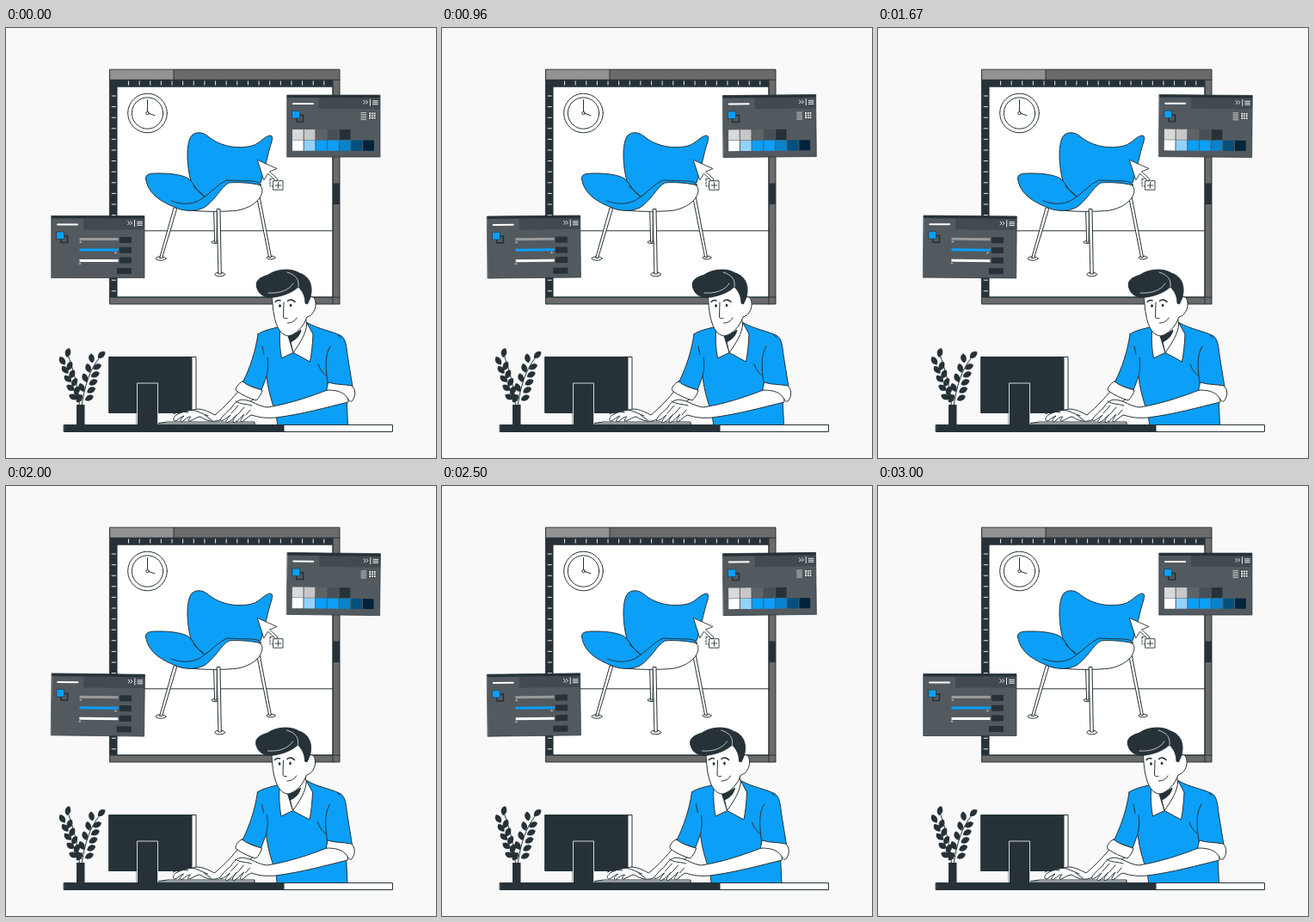
An HTML page that plays this animation: 500 px wide and 500 px high, repeating every 3040 ms.

```html
<!DOCTYPE html>
<html>
<head>
<meta charset="utf-8">
<style>
html, body { margin: 0; width: 100%; height: 100%; overflow: hidden; background: #f9f9f9; }
svg { display: block; width: 100%; height: 100%; }
.k { fill: #263238; }
.w { fill: #fff; }
.b { fill: #0b9ff8; }
.n { fill: none; }
.l { stroke: #263238; stroke-linecap: round; stroke-linejoin: round; }
</style>
</head>
<body>
<svg viewBox="0 0 500 500">
  <defs>
    <g id="panel">
      <path class="l" fill="#535a5f" stroke-width=".7" d="M0 0h108v72H0z"/>
      <path fill="#414a50" d="M37 3h71v13H37z"/>
      <path class="k" d="M0 0h108v3H0z"/>
      <path class="n" stroke="#fff" stroke-width="2" stroke-linecap="round" d="M7 10h23"/>
      <path class="n" stroke="#fff" stroke-width=".9" d="M88.500 6l2.200 2.200-2.200 2.200M91.500 6l2.200 2.200-2.200 2.200M96.500 4.500v8M99.200 6.800h6.500M99.200 8.800h6.500M99.200 10.800h6.500"/>
      <path class="n" stroke="#263238" stroke-width="1.700" d="M10.800 23.300h7.700v7.700h-7.700z"/>
      <path class="b l" stroke-width=".6" d="M6 18.500h8.500v8.500H6z"/>
    </g>
  </defs>

  <!-- drawing window -->
  <path class="l" fill="#6b6b6b" d="M120.800 48.200h267.200v272.800H120.800z"/>
  <path fill="#929292" d="M121.300 48.700h73.700v11.300h-73.700z"/>
  <path class="w l" d="M129 68h251v245H129z"/>
  <path class="k" d="M121 60h259v8.500H129.500v244.500H121zM380 180.500h8v24.500h-8z"/>
  <path class="n l" d="M121 60.300h267M380 60v261M121 313h267M195 48.500v11.500"/>
  <path id="ticks" class="n" stroke="#fff" stroke-width=".9"/>
  <path class="n l" d="M129 235.800h251"/>

  <!-- clock -->
  <g class="w l">
    <circle cx="164.500" cy="99" r="22.800"/>
    <circle cx="164.500" cy="99" r="18.200"/>
    <path d="M164.500 99V83.500M164.500 99l8.500 2.700"/>
    <circle cx="164.500" cy="99" r="1.700"/>
  </g>

  <!-- chair -->
  <g class="w l">
    <ellipse cx="244" cy="249" rx="5" ry="1.500"/>
    <path d="M242 211h3.500l-.5 38h-2z"/>
    <ellipse cx="180" cy="268" rx="6" ry="2.200"/>
    <path d="M195.500 209h3.500l-17.500 58.500h-2.500z"/>
    <ellipse cx="308" cy="267" rx="5" ry="1.900"/>
    <path d="M291.500 194l3-1 14 73.500h-2.500z"/>
    <path class="b" d="M215 178C210 160 209 133 216 125C221 120 229 121 235 126C249 138 270 141 286 137C296 134 300 126 307 125C310 125 310 128 309 132C304 147 302 162 296 180L255 190L231 200Z"/>
    <path d="M205 211C225 214 254 214 270 212C288 208 298 198 298 188C297 181 290 180 282 179L256 178L228 200Z"/>
    <path class="b" d="M162.500 175C162 169 169 169 180 169C192 169 206 171 212 175C219 181 222 191 231 196C239 191 246 182 257 177L284 178C292 178 295 180 297 183C286 180 270 179 259 180C250 185 242 202 230 209C221 213 212 213 203 211C184 204 165 195 162.500 175Z"/>
    <path class="n" d="M192 201C205 206 220 206 231 196M231 196C228 192 222 189 218 184"/>
    <ellipse cx="248.700" cy="286.500" rx="6" ry="2.300"/>
    <path d="M245.500 210.500h3.500l1.300 75.500h-3z"/>
  </g>

  <!-- cursor -->
  <g class="w l" stroke-width=".9">
    <path class="n" stroke-dasharray="2 1.500" d="M307 175.500h8.500v8.500H307z"/>
    <path d="M292.500 153.500L315 163.500L306.500 167L316 175.800L314 178L304.500 169.200L300 176.500Z"/>
    <path d="M311 177.700h11v10.500h-11zM316.500 179.700v6.500M313.200 183h6.600"/>
  </g>

  <!-- floating panels -->
  <g id="right">
    <use href="#panel" x="327" y="78"/>
    <path class="n" stroke="#ddd" stroke-width=".8" d="M412.500 98.500h6.500m-6.500 2h6.500m-6.500 2h6.500m-6.500 2h6.500m-6.500 2h6.500"/>
    <path class="w l" stroke-width=".7" d="M422 98h8v8h-8z"/>
    <path class="n l" stroke-width=".8" d="M424.700 98v8M427.300 98v8M422 100.700h8M422 103.300h8"/>
  </g>
  <g id="left">
    <use href="#panel" x="53" y="218.500"/>
    <g class="n" stroke-width="3">
      <path stroke="#9b9b9b" d="M85.500 245.500H130.500"/>
      <path stroke="#0b9ff8" d="M85.500 258H130.500"/>
      <path stroke="#fff" d="M85.500 270.500H130.500"/>
    </g>
    <path fill="#aaa" stroke="#555" stroke-width=".4" d="M86.700 246.500l2 3.500h-4zM127.500 259l2 3.500h-4zM86 271.500l2 3.500h-4z"/>
    <path class="k" d="M132 243h14v7h-14zM132 254.800h14v7h-14zM132 266.500h14v7h-14zM129 279h17v7h-17z"/>
  </g>

  <!-- plant, computer, desk -->
  <g id="plant" class="k">
    <path d="M82 438h9.500v24H82z"/>
    <path class="n l" d="M85.500 440C84 415 77 394 72 380M88 440C91 418 97 397 109 383"/>
  </g>
  <path class="w l" d="M215 382.500h6v65h-6z"/>
  <path class="k l" d="M120 382.500h96v65h-96z"/>
  <path class="w l" d="M177.500 459.500L188 458H289V461.500H177.500Z"/>
  <path class="n l" d="M178 460h111"/>

  <g id="person" class="l">
    <!-- far arm and hand -->
    <path class="w" d="M272 420C264 430 255 440 243 450C235 446 226 441 218 444C210 445 203 447 198 450C194 453 194 457 197 457C200 456 203 452 207 451C204 454 201 457 204 458C208 456 211 452 215 452C212 455 211 458 214 457C219 455 222 452 226 452C232 456 240 459 248 456C265 446 281 437 293 428Z"/>
    <path class="n" d="M216 444C223 445 229 449 235 451M195 449C200 446 206 446 212 447M231 450l8 6"/>
    <!-- torso -->
    <path class="b" d="M293 356C300 351 309 350 319 347L351 343C363 350 378 352 390 358C395 362 396 370 397 380L403 417L396 430L397.500 461.500H315.500C315 446 306 432 303 405L297 421L275 413C284 394 290 377 293 356Z"/>
    <path class="n" d="M303 405C305 397 305 390 304 383M298 370L300 380M374 413C372 396 370 382 377 370M363 391C365 397 368 401 372 404M386 357L389 360"/>
    <path class="w" d="M275 411C270 413 266 419 268 422C275 427 284 431 291 433C294 430 297 426 298 421C290 419 281 416 275 411Z"/>
    <!-- near arm and hand -->
    <path class="w" d="M376 420C354 429 325 438 304 441C294 440 287 434 280 433C271 430 265 436 262 442C256 447 251 452 249 456C252 458 257 453 261 450C258 454 254 458 257 459C262 457 266 452 269 449C266 453 262 457 265 459C270 457 273 452 277 449C275 453 271 457 274 458C279 456 281 451 286 450C294 453 304 454 314 453C345 449 373 441 398 435L397 420Z"/>
    <path class="n" d="M267 434C273 438 280 437 286 439M262 448l8-9M270 449l7-8M279 450l5-6"/>
    <path class="w" d="M375 412C382 415 393 414 402 416C407 420 407 429 402 434C400 435 399 433 397 430C392 422 382 421 373 421Z"/>
    <!-- neck and collar -->
    <path class="w" d="M328 352L334 378L352 354L348 336Z"/>
    <path class="k" d="M328 357C335 357 340 353 343 351C342 357 338 362 331 365Z"/>
    <path class="w" d="M319 348C317.500 360 318.500 373 320.500 384L334 377.500L328 358ZM350 343L357 356C356.500 367 355.500 378 353.500 388L334 377.500C342 366 349 356 350 343Z"/>
    <!-- head -->
    <path class="w" d="M309 306C310 319 310 331 314 343C317 352 322 358 329 358C338 356 346 347 350 336C356 335 361 327 360 319C359 311 353 311 350 316L346 297L322 302Z"/>
    <path class="k" d="M291.500 301C289 292 299 289 305 287C315 280 332 279 341 285C354 289 357 301 354 313L350.500 321L348 320C348 312 345 306 340 301C333 307 326 310 317 312C306 315 294 313 291.500 301Z"/>
    <path fill="none" stroke="#fff" stroke-width=".7" d="M305 308C318 309 329 305 334 297M327 284C337 287 341 292 340 301"/>
    <path class="n" stroke-width="1.600" d="M313 318.500C315 316.500 317 316 319 317M327.500 317.500C330 315 334 316 336 318.500"/>
    <path class="n" d="M323 319L322.500 336C323 338 325 338 327 337.500M327.500 343C332 343 336 341 338 337"/>
    <ellipse class="k" cx="318.500" cy="323" rx=".8" ry="1.600"/>
    <ellipse class="k" cx="331" cy="322.500" rx=".8" ry="1.600"/>
  </g>

  <path class="k l" d="M152.500 413h24v49h-24z"/>
  <path class="n" stroke="#fff" stroke-width=".8" d="M152.500 461V413h24v48"/>
  <path class="w l" d="M323 461.500h126.500v8H323z"/>
  <path class="k l" d="M67.500 461.500H323v8H67.500z"/>
</svg>
<script>
const $ = id => document.getElementById(id);

function add(parent, tag, attrs) {
  const el = document.createElementNS('http://www.w3.org/2000/svg', tag);
  for (const key in attrs) el.setAttribute(key, attrs[key]);
  parent.append(el);
}

let ticks = '';
for (let x = 142.5; x < 378; x += 12.63) ticks += `M${x} 61.500v5`;
for (let y = 79; y < 312; y += 12.6) ticks += `M122.800 ${y}h5`;
$('ticks').setAttribute('d', ticks);

const swatches = [
  ['#d9d9d9', '#c7c7c7', '#5d6367', '#475056', '#263238'],
  ['#fff', '#91d2fb', '#0b9ff8', '#0b9ff8', '#0983cc', '#06507c', '#03243a']
];
swatches.forEach((row, r) => row.forEach((fill, i) =>
  add($('right'), 'rect', { x: 333 + 13.7 * i, y: 118 + 12.6 * r, width: 12.7, height: 12.1, fill })));

function leaf(x, y, turn) {
  add($('plant'), 'path', {
    d: 'M0 5.500C-5 2-4-4 .5-5.500C4.500-2 4 3 0 5.500Z',
    transform: `translate(${x} ${y}) rotate(${turn})`
  });
}

// Pairs of leaves down each stem, turning outwards towards the vase
leaf(72, 377.5, 12);
leaf(111, 380, 48);
for (let i = 0; i < 5; i++) {
  const y = 10.5 * i;
  leaf(65.5 + 3.2 * i, 387 + y, -32 - 9 * i);
  leaf(74 + 2.8 * i, 393 + y * .9, 22 + 3 * i);
  leaf(99.5 - 3.8 * i, 384 + y * 1.08, -10 - 6 * i);
  leaf(106 - 2.3 * i, 394 + y * .86, 62);
}

const LOOP = 3040, SWING = 1500;
const sway = [[0, 0], [960, 0], [1250, -1], [1670, 0], [2000, -.5], [2500, -2.5], [3000, -1], [3040, 0]];

function swing(t) {
  const u = t / SWING % 1;
  return u < .25 ? 4 * u : u < .75 ? 2 - 4 * u : 4 * u - 4;
}

function shift(t) {
  const i = sway.findIndex(key => key[0] > t);
  const [t0, x0] = sway[i - 1], [t1, x1] = sway[i];
  return x0 + (x1 - x0) * (1 - Math.cos(Math.PI * (t - t0) / (t1 - t0))) / 2;
}

function draw(now) {
  const t = Math.max(0, now) % LOOP;
  const angle = swing(Math.min(t, 2 * SWING));
  $('right').setAttribute('transform', `rotate(${angle} 381 114)`);
  $('left').setAttribute('transform', `rotate(${angle} 107 254.500)`);
  $('person').setAttribute('transform', `translate(${shift(t)})`);
}

const start = performance.now();
(function tick() {
  draw(performance.now() - start);
  requestAnimationFrame(tick);
})();
</script>
</body>
</html>
```
